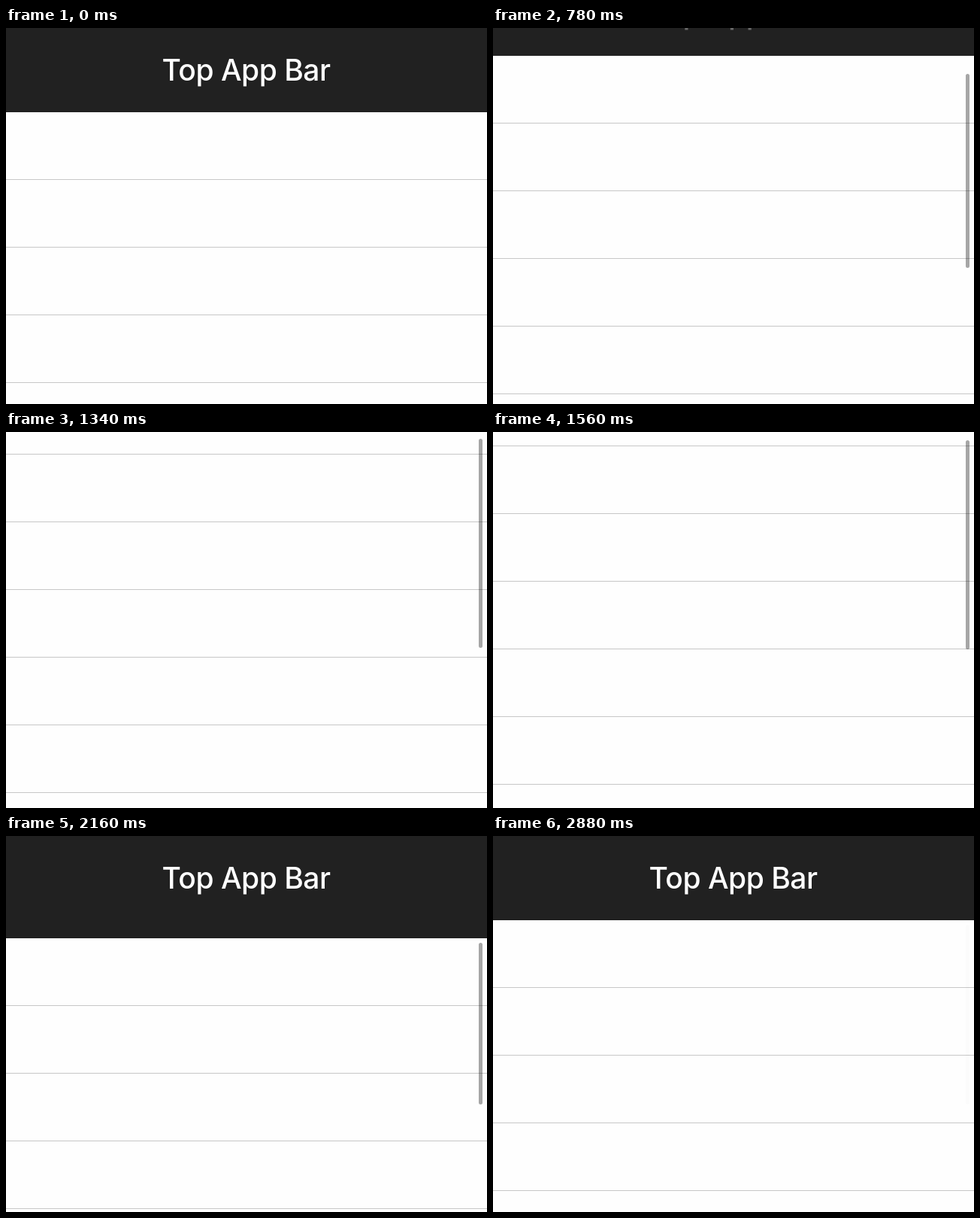
An HTML page with a canvas for the animation above (4900 ms loop, 640 by 500 pixels).

```html
<!DOCTYPE html>
<html lang="en">
<head>
<meta charset="utf-8">
<title>Top App Bar</title>
<style>
  html, body { margin: 0; width: 100%; height: 100%; overflow: hidden; background: #fefefe; }
  canvas { display: block; }
</style>
</head>
<body>
<canvas id="stage" width="640" height="500"></canvas>
<script>
const ctx = document.getElementById("stage").getContext("2d");
const LOOP = 4900, STEP = 20, WIDTH = 640, HEIGHT = 500;
const BAR = 112, ROW = 90, HIDDEN = -40, MAX_SCROLL = 183;
const BOUNCE_START = 1954, BOUNCE_SPEED = 0.717, BOUNCE_DAMPING = 0.0089;
const FADE_START = 2640, FADE_END = 2880;

// Scroll keys: time, offset, velocity in px/ms
const scrollKeys = [
  [505, 0, 0.16], [780, 75, 0.29], [1120, 139, 0.2], [1560, MAX_SCROLL, 0],
  [1715, MAX_SCROLL, -0.3], [BOUNCE_START, 0, -BOUNCE_SPEED]
];

const clamp = (x, low = 0, high = 1) => Math.min(high, Math.max(low, x));

function hermite([t0, p0, v0], [t1, p1, v1], t) {
  const d = t1 - t0, u = (t - t0) / d, w = 1 - u;
  return p0 * (1 + 2 * u) * w * w + p1 * u * u * (3 - 2 * u)
    + d * u * w * (v0 * w - v1 * u);
}

function scrollAt(t) {
  if (t < 520) return 0;
  if (t >= BOUNCE_START) {
    const dt = t - BOUNCE_START;
    return -BOUNCE_SPEED * dt * Math.exp(-BOUNCE_DAMPING * dt);
  }
  if (t >= 1560 && t < 1720) return MAX_SCROLL;
  const i = scrollKeys.findIndex(key => t < key[0]);
  return hermite(scrollKeys[i - 1], scrollKeys[i], t);
}

// Lower edge of the bar: it leaves with the content and returns on reverse scroll
function barEdge(t, scroll) {
  if (scroll < 0) return BAR - scroll;
  return t < 1640
    ? Math.max(BAR - scroll, HIDDEN)
    : Math.min(BAR, HIDDEN + MAX_SCROLL - scroll);
}

function drawRows(scroll) {
  ctx.fillStyle = "#c7c7c7";
  for (let y = BAR + ROW - 1 - scroll; y < HEIGHT; y += ROW) ctx.fillRect(0, y, WIDTH, 1);
}

function drawBar(edge, scroll) {
  if (edge <= 0) return;
  const overlap = edge - (BAR - scroll);
  const strength = clamp(overlap / 16) * clamp(edge / 16);
  if (strength > 0) {
    ctx.save();
    ctx.shadowColor = `rgba(0,0,0,${0.62 * strength})`;
    ctx.shadowBlur = 9;
    ctx.shadowOffsetY = 4;
    ctx.fillStyle = "#212121";
    ctx.fillRect(2, -20, WIDTH - 4, edge + 20);
    ctx.restore();
  }
  ctx.fillStyle = "#212121";
  ctx.fillRect(0, 0, WIDTH, edge);

  const shift = Math.max(0, BAR - edge);
  ctx.fillStyle = `rgba(255,255,255,${1 - shift / BAR})`;
  ctx.font = "500 39px Inter, Roboto, sans-serif";
  ctx.letterSpacing = "-0.5px";
  ctx.textAlign = "center";
  ctx.fillText("Top App Bar", WIDTH / 2 - 0.5, 70 - shift);
}

function drawIndicator(t, edge, scroll) {
  if (t < 520) return;
  const fade = clamp((t - FADE_START) / (FADE_END - FADE_START));
  const top = Math.round(edge + 5.5 + 0.25 * Math.max(scroll, 0));
  const stretch = BAR - edge;
  const length = Math.round(239 + stretch * (stretch > 0 ? 0.258 : 1));
  ctx.fillStyle = `rgba(0,0,0,${0.35 + (0.012 - 0.35) * fade})`;
  ctx.beginPath();
  ctx.roundRect(629, top, 5, length, 2.5);
  ctx.fill();
}

function draw(now) {
  const t = Math.floor((now % LOOP) / STEP) * STEP;
  const scroll = Math.round(scrollAt(t));
  const edge = barEdge(t, scroll);
  ctx.fillStyle = "#fefefe";
  ctx.fillRect(0, 0, WIDTH, HEIGHT);
  drawRows(scroll);
  drawBar(edge, scroll);
  drawIndicator(t, edge, scroll);
}

let start;
function tick(now) {
  start ??= now;
  draw(now - start);
  requestAnimationFrame(tick);
}
requestAnimationFrame(tick);
</script>
</body>
</html>
```
